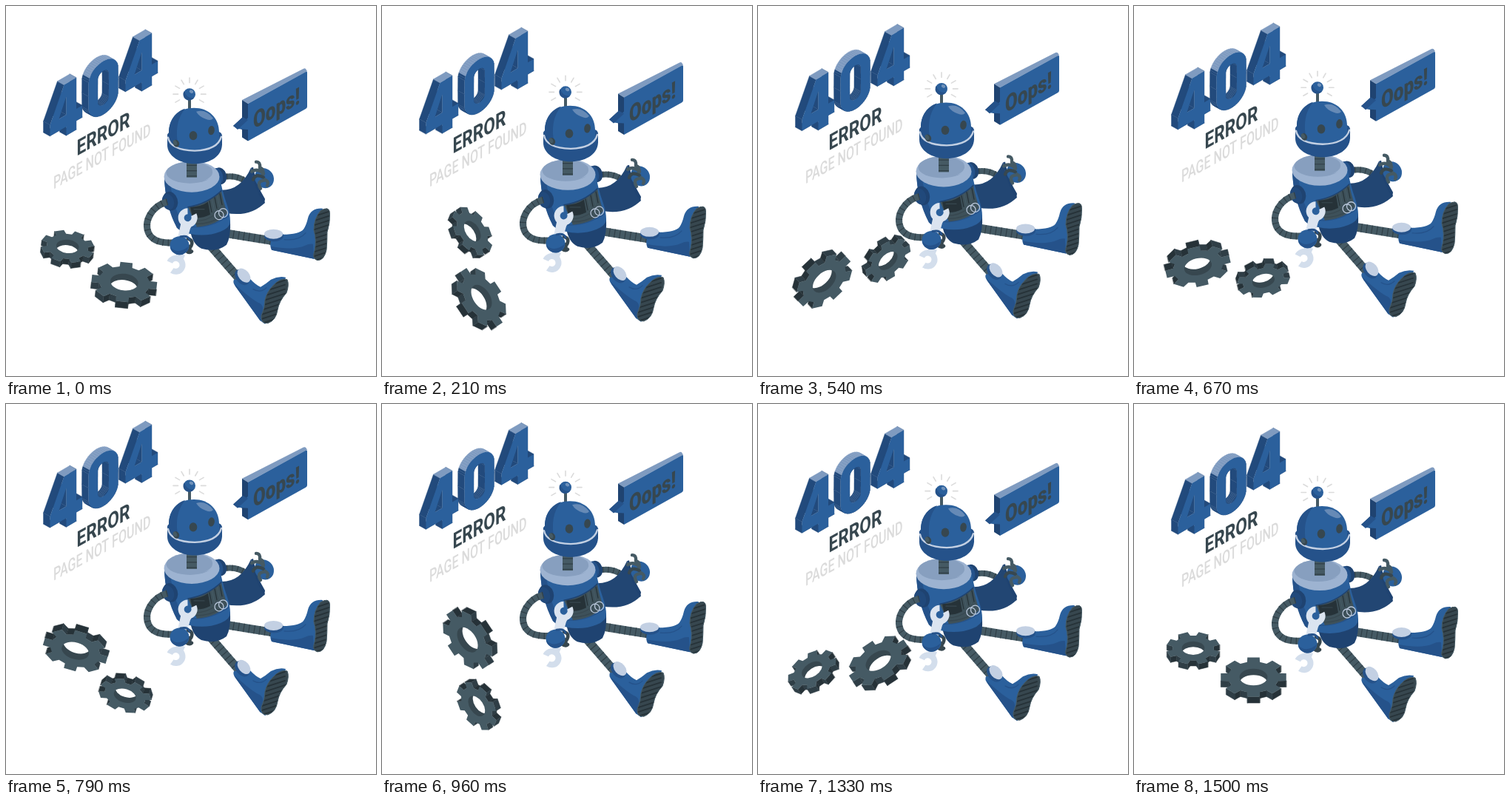
An HTML page with a canvas that plays this animation: 500 px wide and 500 px high, repeating every 1.54 s.

```html
<!DOCTYPE html>
<html lang="en">
<head>
<meta charset="utf-8">
<title>404</title>
<style>
html, body { margin: 0; width: 100%; height: 100%; overflow: hidden; background: #fff; }
canvas { display: block; width: 500px; height: 500px; }
</style>
</head>
<body>
<canvas id="stage"></canvas>
<script>
const SIZE = 500, LOOP = 1540, STEPS = 37;
const BLUE = '#2b609c', SHADE = '#25528a', DEEP = '#1f4371', PALE = '#7f9bc0', SILVER = '#9db3d1';
const STEEL = '#455a64', IRON = '#37474f', COAL = '#263238', MIST = '#dbdbdb', ICE = '#dbe4f0';

const canvas = document.getElementById('stage');
const ctx = canvas.getContext('2d');
const ratio = window.devicePixelRatio || 1;
canvas.width = canvas.height = SIZE * ratio;

function fill(path, color) {
  ctx.fillStyle = color;
  ctx.fill(new Path2D(path));
}

function line(path, width, color) {
  ctx.lineWidth = width;
  ctx.strokeStyle = color;
  ctx.stroke(new Path2D(path));
}

function oval(x, y, rx, ry, color, turn = 0) {
  ctx.beginPath();
  ctx.ellipse(x, y, rx, ry, turn, 0, Math.PI * 2);
  ctx.fillStyle = color;
  ctx.fill();
}

function moved(dx, dy, draw) {
  ctx.save();
  ctx.translate(dx, dy);
  draw();
  ctx.restore();
}

const toPath = points => 'M' + points.map(p => p.join(' ')).join('L') + 'Z';

// Ribbed hose
function tube(path, width) {
  ctx.lineCap = 'butt';
  line(path, width, STEEL);
  ctx.setLineDash([1.2, 6]);
  line(path, width, '#303f47');
  ctx.setLineDash([]);
  ctx.lineCap = 'round';
}

// Lettering on a wall that recedes to the right
function wallText(text, x, y, weight, size, foreshorten, color) {
  ctx.save();
  ctx.transform(foreshorten, -foreshorten * 0.555, 0, 1, x, y);
  ctx.font = `${weight} ${size}px Roboto, sans-serif`;
  ctx.textBaseline = 'alphabetic';
  ctx.fillStyle = color;
  ctx.fillText(text, 0, 0);
  ctx.restore();
}

// Solid digits: outlines in wall units, extruded backwards
const FOUR = [
  [[0, 0], [0, 15], [19, 58], [35.5, 58], [35.5, 16], [43.5, 16], [43.5, 0], [35.5, 0], [35.5, -12], [22, -12], [22, 0]],
  [[12, 16], [22, 16], [22, 41]]
];

function capsule(cx, cy, r, half) {
  return Array.from({ length: 48 }, (_, i) => {
    const a = i / 48 * Math.PI * 2, s = Math.sin(a);
    return [cx + r * Math.cos(a), cy + r * s + Math.sign(Math.round(s * 1e6)) * (half - r)];
  });
}
const ZERO = [capsule(20, 23.5, 20, 36), capsule(20, 23.5, 7.5, 23)];

function solid(outlines, x0, y0) {
  const place = ([u, v]) => [x0 + u, y0 - v - 0.58 * u];
  const back = ([x, y]) => [x - 9, y - 5];
  const walls = [];
  for (const outline of outlines) {
    outline.forEach((a, i) => {
      const b = outline[(i + 1) % outline.length], p = place(a), q = place(b);
      walls.push({ lit: a[1] > 47 && b[1] > 47, path: toPath([p, q, back(q), back(p)]) });
    });
  }
  walls.sort((a, b) => a.lit - b.lit);
  for (const { lit, path } of walls) {
    const color = lit ? PALE : '#224a7c';
    fill(path, color);
    line(path, 0.4, color);
  }
  ctx.fillStyle = BLUE;
  ctx.fill(new Path2D(outlines.map(o => toPath(o.map(place))).join('')), 'evenodd');
}

function title() {
  solid(FOUR, 161.5, 116);
  solid(ZERO, 111.5, 146);
  solid(FOUR, 59.5, 176);
  wallText('ERROR', 95.5, 203, 700, 29.5, 0.77, IRON);
  wallText('PAGE NOT FOUND', 64, 248, 500, 24, 0.67, MIST);
}

function bubble() {
  fill('M319 128L402 85.800Q404 85 405 86L407 89L327 133Z', PALE);
  fill('M319 128L327 133V183.500L319 178.500V168L307 163L319 152Z', DEEP);
  fill('M327 133L405 90Q407 89 407 91V137Q407 139 405 140L327 183.500V168L312 167L327 152Z', BLUE);
  fill('M307 163L320 151L327 155L313 168Z', SHADE);
  wallText('Oops!', 334, 167.5, 900, 31.5, 0.77, IRON);
}

function gear(cx, cy, r, turn, depth) {
  const flat = 0.6, points = [];
  for (let i = 0; i < 8; i++) {
    for (const [da, k] of [[-0.25, 0.77], [-0.185, 1], [0.185, 1], [0.25, 0.77]]) {
      const a = turn + i * Math.PI / 4 + da;
      points.push([cx + r * k * Math.cos(a), cy + r * k * flat * Math.sin(a)]);
    }
  }
  points.forEach((p, i) => {
    const q = points[(i + 1) % points.length];
    if (p[0] <= q[0]) return;
    const color = q[1] < p[1] ? '#2f3e46' : COAL;
    const side = toPath([p, q, [q[0], q[1] + depth], [p[0], p[1] + depth]]);
    fill(side, color);
    line(side, 0.5, color);
  });
  fill(toPath(points), STEEL);
  ctx.save();
  ctx.beginPath();
  ctx.ellipse(cx, cy, r * 0.42, r * 0.25, 0, 0, Math.PI * 2);
  ctx.clip();
  ctx.fillStyle = IRON;
  ctx.fillRect(cx - r, cy - r, r * 2, r * 2);
  oval(cx, cy + depth, r * 0.42, r * 0.25, '#fff');
  ctx.restore();
}

function gears(angle) {
  ctx.save();
  ctx.translate(125, 356.2);
  ctx.rotate(angle);
  ctx.translate(-125, -356.2);
  gear(80, 329.8, 36.5, Math.PI / 8, 7.5);
  gear(161.5, 369, 45, 0, 8.5);
  ctx.restore();
}

function sole(path, x, y) {
  const shape = new Path2D(path);
  fill(path, IRON);
  ctx.save();
  ctx.clip(shape);
  for (let i = 0; i < 13; i++) line(`M${x} ${y + i * 6}l34 -11`, 1.8, COAL);
  ctx.restore();
  line(path, 1, STEEL);
}

function legs() {
  tube('M300 308Q330 313 362 318', 11.5);
  fill('M350 309Q362 319 374 309Q396 309 402 302Q406 296 408 287Q412 273 428 274L421 343L359 330Q356 325 358 317Z', BLUE);
  fill('M358 325Q388 331 404 324Q410 321 415 322L416 342L359 330Z', SHADE);
  line('M376 316Q396 318 405 307', 1.2, SHADE);
  oval(362, 311, 13, 7.5, SHADE);
  oval(361.5, 308.5, 12.5, 6.5, '#c3d0e3');
  sole('M425 277Q437 270 437.500 280Q438 294 434 306Q434 318 433 330Q430 344 421 344Q413 342 417 331Q420 317 416 303Q416 287 425 277Z', 412, 280);

  tube('M276 324L316 370', 11.5);
  fill('M308 370L329 368Q337 377 344 380Q351 376 358 370Q368 365 378 367L364 420L350 430L343 425L310 379Q306 374 308 370Z', BLUE);
  fill('M309 376Q333 398 343 402Q348 405 347 412L344 426L310 379Z', SHADE);
  line('M334 383Q344 389 352 381', 1.2, SHADE);
  oval(319, 367, 8, 12, SHADE, -0.7);
  oval(321.5, 364.5, 7.2, 11, '#c3d0e3', -0.7);
  sole('M361 378Q371 367 380 370Q383 377 379 388Q369 399 367 411Q365 425 354 429Q344 430 345 419Q350 408 350 398Q352 387 361 378Z', 343, 382);
}

function rightArm() {
  tube('M291 232Q311 227 327 239', 8);
  fill('M290 249Q317 250 331 219Q335 240 350 266Q330 286 297 280Z', '#224673');
  fill('M331 219L334 218Q338 242 350 261L349 268Q335 245 331 219Z', DEEP);
  oval(289, 230, 9, 11.5, DEEP, -0.3);
  oval(286, 230, 7, 11, SHADE, -0.3);
  oval(349, 233, 12.5, 14, BLUE, -0.6);
  line('M338 211Q344 211 343 219Q349 220 347 229', 4.4, STEEL);
  line('M332 224Q340 219 348 227', 4.4, STEEL);
  line('M334 235Q337 226 348 232', 4.4, IRON);
  line('M344 247Q338 237 349 236M353 243Q356 238 350 235', 4.4, STEEL);
}

function torso() {
  fill('M249 304L303 290Q304 312 298 323Q284 334 264 328Q252 322 249 304Z', DEEP);
  fill('M214 231H289Q291 247 299 270Q303 282 303 291Q303 300 290 305Q270 313 248 308Q237 306 231 300Q214 264 214 231Z', BLUE);
  fill('M214 231Q215 271 231 300Q236 305 244 307Q227 276 222 242Z', SHADE);
  line('M234 295Q266 307 301 284', 1.2, SHADE);

  fill('M246 272Q272 268 291 250Q293 263 299 280Q287 296 258 299Z', '#3e515a');
  fill('M249 272Q263 272 273 265L276 282Q264 288 252 286Z', COAL);
  for (let i = 0; i < 5; i++) line(`M${275 + i * 3.5} ${264 - i * 2.5}l3 15`, 1.2, i % 2 ? STEEL : COAL);
  line('M255 291Q272 291 284 281M257 295Q275 295 292 285M254 275H268', 1.2, IRON);
  line('M246 272Q272 268 291 250', 1.5, DEEP);

  oval(251, 231, 37.5, 21, SILVER);
  oval(248.5, 225.5, 32, 14.5, '#879fbf');
  fill('M276 217Q285 229 268 236Q281 233 284 226Z', SILVER);
  tube('M251 208V232', 14);
  line('M282 283a6 6 0 1 0 12 0a6 6 0 1 0 -12 0M287.500 280a6 6 0 1 0 12 0a6 6 0 1 0 -12 0', 1.3, '#b9c7db');
}

function leftArm() {
  oval(222, 264, 10, 13, DEEP, -0.3);
  oval(219, 265, 8, 11, '#21497b', -0.3);
  tube('M218 265C198 270 185 291 193 308Q201 322 226 320', 9);
  // Double-ended wrench: two open rings on a handle
  fill('M237 291L253 294L249 301L242 326L230 323Z', ICE);
  fill('M230 333L242 337L238 346L229 344Z', '#d3deec');
  ctx.lineCap = 'butt';
  line('M253.700 282.500A9 9 0 1 1 245.500 277.500', 8, ICE);
  line('M221.300 346.500A9 9 0 1 1 224.300 357.500', 8, '#d3deec');
  ctx.lineCap = 'round';
  line('M246 315Q254 317 250 325M245 324Q251 327 247 331M243 331Q248 335 251 332', 4.6, IRON);
  oval(234.5, 324, 13, 12.5, BLUE);
  fill('M222 326Q232 337 247 325Q243 339 231 336Q223 333 222 326Z', SHADE);
  line('M236 312Q246 310 248 316', 3, SHADE);
}

function head() {
  for (let i = -1; i <= 7; i++) {
    const a = i * Math.PI / 6, c = Math.cos(a), s = Math.sin(a);
    line(`M${248 + 15.5 * c} ${119.5 - 15.5 * s}L${248 + 22 * c} ${119.5 - 22 * s}`, 1.6, MIST);
  }
  line('M248 125V143', 4, STEEL);
  oval(248, 119.5, 8, 8, BLUE);
  fill('M241 115A8 8 0 0 0 254 124.500Q244 126 241 115Z', SHADE);
  oval(250.5, 116, 2.8, 2.2, '#6f91ba', 0.5);

  fill('M218 174Q220 170 224 170H287Q291 171 292 175V188C291 205 273 213.500 255 213.500C235 213.500 218 203 218 188Z', SHADE);
  fill('M220 184V172C220 151 234 138 254 138C274 138 288 151 288 172V184Q255 208 220 184Z', BLUE);
  fill('M220 184V172C220 155 229 143 242 139Q226 158 233 191Q225 189 220 184Z', SHADE);
  line('M219 178Q222 195 255 196Q286 195 291 177', 2.4, '#c3d0e3');
  fill('M257 143Q270 139 280 152Q277 156 270 153Q261 150 257 143Z', '#668ab6');
  oval(253, 175.5, 5.3, 6.2, IRON);
  oval(277.5, 168.5, 4.3, 6.2, IRON, 0.15);
  oval(230, 186, 4, 5, IRON, -0.4);
  oval(228.5, 185, 2.6, 3.6, STEEL, -0.4);
}

function robot() {
  legs();
  rightArm();
  torso();
  leftArm();
  head();
}

function render(now) {
  const step = Math.floor((now % LOOP) * STEPS / LOOP + 0.1);
  // The cycle is one step shorter than the loop and rests on its last pose
  const phase = Math.min(1, (step + 0.65) / (STEPS - 1));
  const lift = 1 - Math.abs(1 - 2 * phase);
  ctx.setTransform(ratio, 0, 0, ratio, 0, 0);
  ctx.fillStyle = '#fff';
  ctx.fillRect(0, 0, SIZE, SIZE);
  ctx.lineCap = ctx.lineJoin = 'round';
  gears(phase * Math.PI * 2);
  moved(0, -10 * lift, () => { title(); robot(); });
  moved(0, -30 * lift, bubble);
}

let start;
function tick(now) {
  start ??= now;
  render(now - start);
  requestAnimationFrame(tick);
}
render(0);
requestAnimationFrame(tick);
</script>
</body>
</html>
```
